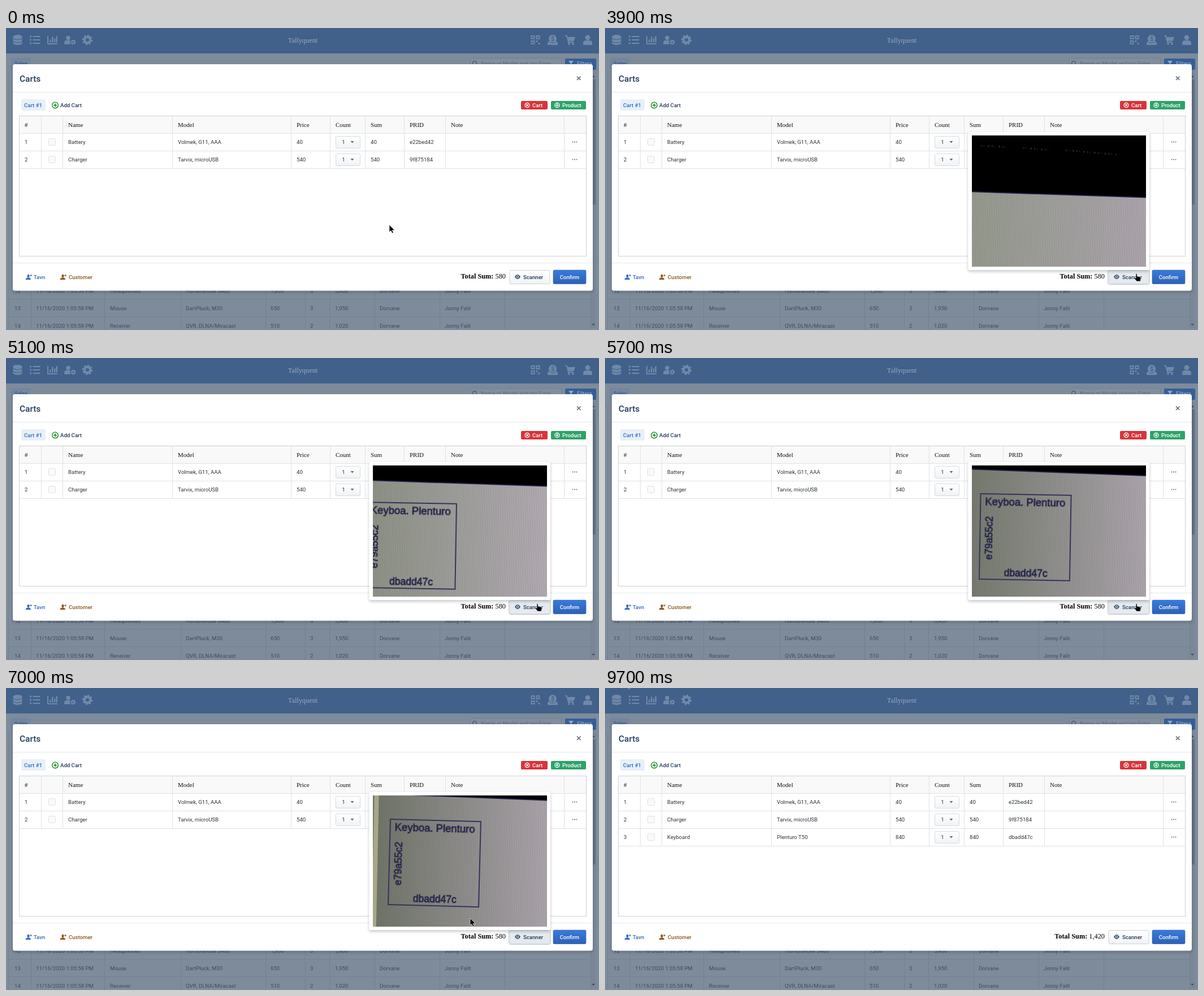
An HTML page that plays this animation: 1049x534 px, repeating every 9800 ms.

```html
<!DOCTYPE html>
<html lang="en">
<head>
<meta charset="utf-8">
<title>Carts</title>
<style>
  html, body { margin: 0; width: 100%; height: 100%; overflow: hidden; background: #7e8b9b; }
  svg { display: block; }
  text { font: 9.6px Roboto, sans-serif; fill: #2c343b; white-space: pre; }
  .serif { font: 11px "Liberation Serif", serif; fill: #111; }
  .total { font: 12.3px "Liberation Serif", serif; fill: #000; }
  .med { font-weight: 500; }
  .mid { text-anchor: middle; }
  .end { text-anchor: end; }
  .dim { fill: #3d4c60; }
  .label { filter: blur(.5px); }
  .label text { font: 18.5px "Liberation Sans", sans-serif; fill: #25234a; stroke: #25234a; stroke-width: .8px; }
  .label .code { font-size: 17.5px; }
</style>
</head>
<body>
<svg id="stage" width="1049" height="534" viewBox="0 0 1049 534"></svg>
<script>
const rect = (x, y, w, h, fill, extra = '') =>
  `<rect x="${x}" y="${y}" width="${w}" height="${h}" fill="${fill}" ${extra}/>`;
const text = (x, y, content, cls = '', extra = '') =>
  `<text x="${x}" y="${y}" class="${cls}" ${extra}>${content}</text>`;
const path = (d, fill, extra = '') => `<path d="${d}" fill="${fill}" ${extra}/>`;
const line = (d, color, width = 1, extra = '') =>
  path(d, 'none', `stroke="${color}" stroke-width="${width}" ${extra}`);
const circle = (x, y, r, fill, extra = '') =>
  `<circle cx="${x}" cy="${y}" r="${r}" fill="${fill}" ${extra}/>`;
const at = (x, y, body) => `<g transform="translate(${x} ${y})">${body}</g>`;
const fillColor = color => `style="fill:${color}"`;

// ---- Toolbar icons, each centred on 0,0 ----
const ink = '#7089a9', bar = '#41608a';
const gear = r => circle(0, 0, r * .58, 'none', `stroke="${ink}" stroke-width="${r * .48}"`) +
  circle(0, 0, r * .88, 'none',
    `stroke="${ink}" stroke-width="${r * .3}" stroke-dasharray="${r * .46}" pathLength="${r * .46 * 16}"`);
const person = circle(0, -4, 4.4, ink) + path('M-8 9v-3q0-5 5-5h6q5 0 5 5v3z', ink);
const icons = {
  database: path('M-8-6a8 3 0 0 1 16 0v12a8 3 0 0 1-16 0z', ink) +
    line('M-8-2.5q8 4 16 0M-8 3q8 4 16 0', bar, 1.2),
  list: [-6, 0, 6].map(y => circle(-7.5, y, 1.8, ink) + rect(-3.5, y - 1.1, 13, 2.2, ink)).join(''),
  chart: line('M-8-7V7H9', ink, 2) +
    [[-5, 5], [-1, 10], [3, 7], [6.6, 11]].map(([x, h]) => rect(x, 4.5 - h, 2.4, h, ink)).join(''),
  userGear: `<g transform="translate(-3 0) scale(.85)">${person}</g>` +
    at(6, 4, circle(0, 0, 6, bar) + gear(4.5)),
  gear: gear(9),
  tiles: [[-8, -8], [1, -8], [-8, 1]].map(([x, y]) =>
    rect(x + 1, y + 1, 5, 5, 'none', `stroke="${ink}" stroke-width="2"`)).join('') +
    rect(1, 1, 3, 3, ink) + rect(5, 5, 3, 3, ink),
  money: path('M-9 9v-4l3-3h12l3 3v4z', ink) + circle(0, -2, 7.5, ink, `stroke="${bar}"`) +
    text(0, 2, '$', 'mid med', `style="fill:${bar};font-size:11px"`),
  cart: line('M-9-7h3l3 11h9', ink, 2) + path('M-6-5H9L6.5 2h-10z', ink) +
    circle(-2, 7, 1.9, ink) + circle(5, 7, 1.9, ink),
  person
};

// ---- Dimmed page behind the dialog ----
function page() {
  const spots = { database: 20.5, list: 51, chart: 82, userGear: 113, gear: 144,
    tiles: 936.5, money: 967, cart: 998, person: 1029 };
  const columns = [15, 53, 184, 318, 468, 538, 582, 661, 776];
  const rows = [
    ['12', '11/16/2020 1:05:58 PM', 'Headphones', 'Humbravoxe S400', '1,800', '3', '5,400'],
    ['13', '11/16/2020 1:05:58 PM', 'Mouse', 'DartPluck, M30', '650', '3', '1,950'],
    ['14', '11/16/2020 1:05:58 PM', 'Receiver', 'QVR, DLNA/Miracast', '510', '2', '1,020']
  ];
  const edge = '#738092';
  return rect(0, 0, 1049, 534, '#7e8b9b') + rect(0, 0, 1049, 45, bar) +
    Object.entries(spots).map(([name, x]) => at(x, 21, icons[name])).join('') +
    text(525, 26, 'Tallyquent', 'mid', 'style="font:12.3px \'Liberation Serif\',serif;fill:#9aaabd"') +
    rect(8, 53, 36, 20, '#74869f', 'rx="2"') + text(15, 66, 'Sales', 'med', fillColor('#345a8e')) +
    rect(821.5, 53.5, 161, 20, '#818e9e', `rx="2" stroke="${edge}"`) +
    circle(829, 62, 3.4, 'none', 'stroke="#45566b" stroke-width="1.2"') +
    line('M831.5 64.5l3 3', '#45566b', 1.4) +
    text(840, 66, 'Name or Model and tag Enter', '', fillColor('#5a6a7d')) +
    rect(989, 54, 55, 20, '#355f99', 'rx="2"') +
    path('M995 58h9l-3.5 4.5v5l-2-1.5v-3.5z', '#97a7bc') +
    text(1010, 66, 'Filters', 'med', fillColor('#97a7bc')) +
    line('M4.5 80V534M1034.5 80V534M5 479.5H1034M5 510.5H1034', edge) +
    line([44, 174, 309, 459, 529, 572, 652, 767, 882].map(x => `M${x}.5 464V534`).join(''), edge) +
    rows.map((row, i) => [...row, 'Dorvane', 'Jonny Falit'].map((value, c) =>
      text(columns[c], 468 + i * 31, value, 'dim')).join('')).join('') +
    rect(1035, 80, 9, 450, '#7a8798') + rect(1036, 91, 7, 221, '#637083') +
    path('M1036 87l3-3 3 3zM1036 523l3 3 3-3z', '#3d4c60');
}

// ---- Dialog ----
const columnX = [33, 71, 110, 304, 514, 583, 645, 714, 787];
const button = (x, y, w, h, fill, extra = '') => rect(x, y, w, h, fill, `rx="2" ${extra}`);
const roundIcon = (x, y, r, color, turn = 0) =>
  `<g transform="translate(${x} ${y}) rotate(${turn})">` +
  circle(0, 0, r, 'none', `stroke="${color}" stroke-width="1.3"`) +
  line(`M${-r * .55} 0h${r * 1.1}M0 ${-r * .55}v${r * 1.1}`, color, 1.4) + '</g>';
const userIcon = (x, color) => at(x, 440,
  `<ellipse cx="-.5" cy="-1.5" rx="2" ry="2.8" fill="${color}"/>` +
  path('M-5.5 5q0-2.5 3.500-3.500h3q3 1 3 3.500z', color) +
  line('M2-2.500h3M3.500-4.500l2 2-2 2', color, 1));

function row(y, values) {
  const [number, name, model, price, id] = values;
  const cells = [number, null, name, model, price, null, price, id];
  return cells.map((value, i) => value ? text(columnX[i], y + 4, value) : '').join('') +
    button(75.5, y - 5.5, 12, 12, '#f9fafb', 'stroke="#dde1e4"') +
    button(583.5, y - 9.5, 43, 21, 'url(#soft)', 'stroke="#d6dadd"') +
    text(597, y + 4, '1', 'mid') + path(`M609.5 ${y - 1}h6l-3 3.500z`, '#5c6b78') +
    [1002.5, 1006, 1009.5].map(x => circle(x, y + .5, 1, '#5c7080')).join('') +
    line(`M24 ${y + 16.5}H1026`, '#dfe1e3') +
    line([62, 100, 294, 504, 573, 635, 704, 777, 987]
      .map(x => `M${x}.5 ${y - 14}v31`).join(''), '#dfe1e3');
}

function dialog() {
  const heads = ['#', '', 'Name', 'Model', 'Price', 'Count', 'Sum', 'PRID', 'Note'];
  const navy = '#22395a';
  return rect(12, 64, 1026, 400.5, '#fff', 'rx="4" filter="url(#shadow)"') +
    text(24, 95, 'Carts', 'med', `style="font-size:15.4px;fill:${navy}"`) +
    line('M1010 85.5l6.5 6.5M1016.5 85.5l-6.5 6.5', '#52667a', 1.5) +
    line('M12 113.5H1038M12 415.5H1038', '#e5e8eb') +
    button(27, 126, 43, 20, '#e8eff8') + text(48, 139.5, 'Cart #1', 'mid med', fillColor('#2f70cc')) +
    roundIcon(87, 136.5, 5.3, '#078410') + text(96, 140, 'Add Cart', 'med', fillColor(navy)) +
    button(911, 129, 47, 15, '#d7343a') + roundIcon(922, 136.5, 4, '#fff', 45) +
    text(931, 140, 'Cart', 'med', fillColor('#fff')) +
    button(964, 129, 62, 15, '#2da367') + roundIcon(975, 136.5, 4, '#fff') +
    text(984, 140, 'Product', 'med', fillColor('#fff')) +
    rect(23.5, 155.5, 1003, 248, '#fff', 'stroke="#cdd0d2"') +
    rect(24, 156, 1002, 30, '#f9f9f9') + line('M24 186.5H1026', '#dfe1e3') +
    line([62, 100, 294, 504, 573, 635, 704, 777, 987].map(x => `M${x}.5 156v31`).join(''), '#dfe1e3') +
    heads.map((head, i) => text(columnX[i], 175, head, 'serif')).join('') +
    row(201, ['1', 'Battery', 'Volmek, G11, AAA', '40', 'e22bed42']) +
    row(232, ['2', 'Charger', 'Tarvix, microUSB', '540', '9f875184']) +
    `<g id="added">${row(263, ['3', 'Keyboard', 'Plenturo T50', '840', 'dbadd47c'])}</g>` +
    userIcon(40, '#2f6ac8') + text(49, 444, 'Tavn', 'med', fillColor('#2f66bd')) +
    userIcon(101, '#8a5518') + text(111, 444, 'Customer', 'med', fillColor('#8a5518')) +
    text(884, 443, '<tspan font-weight="bold">Total Sum:</tspan> <tspan id="sum"></tspan>', 'total end') +
    rect(889.5, 426.5, 74, 27, 'none', 'id="ring" rx="3" stroke="#c3cedb"') +
    button(891, 428.5, 71, 24, 'url(#soft)', 'id="scanner" stroke="#cdd3d8"') +
    path('M900 440q5-8 10 0q-5 8-10 0z', '#3f566d') +
    circle(905, 440, 1.9, '#3f566d', 'stroke="#fff" stroke-width=".9"') +
    text(915, 444, 'Scanner', 'med', fillColor(navy)) +
    button(968, 428, 58, 24.5, 'url(#blue)', 'stroke="#2d60b0" stroke-width=".6"') +
    text(997, 444, 'Confirm', 'mid med', fillColor('#fff'));
}

// ---- Scanner popover with camera view ----
const labelArt = `<g class="label" id="label">
  ${rect(0, 0, 160, 151, 'none', 'stroke="#34335c" stroke-width="2"')}
  ${text(79, 20, 'Keyboa. Plenturo', 'mid')}
  ${text(82, 145, 'dbadd47c', 'mid code')}
  ${text(0, 0, 'e79a55c2', 'mid code', 'transform="translate(22 78) rotate(-90)"')}
</g>`;

const popover = `<g id="popover">
  ${rect(642.5, 184, 320.5, 244, '#fff', 'rx="3" filter="url(#shadow)"')}
  <g id="camera" clip-path="url(#lens)">
    ${rect(649, 190, 308, 232, '#000')}
    <g id="glints">${line('M665-81L715-78M740-77L790-73M815-73L905-65', '#777', 3,
      'stroke-dasharray="2 3 1 6 3 4" opacity=".3"')}</g>
    ${path('', 'url(#paper)', 'id="sheet" stroke="#1d1a42" stroke-width="2"')}
    ${path('', 'url(#stripes)', 'id="weave"')}
    ${line('M-24-60L-30 230', '#c6c39a', 8, 'id="strip" opacity=".65"')}
    ${labelArt}
  </g>
</g>`;

const gradient = (id, from, to, direction) =>
  `<linearGradient id="${id}" ${direction}><stop stop-color="${from}"/><stop offset="1" stop-color="${to}"/></linearGradient>`;
const down = 'x2="0" y2="1"';
const stage = document.getElementById('stage');
stage.innerHTML = `<defs>
  ${gradient('soft', '#fff', '#f0f3f6', down)}
  ${gradient('blue', '#397bdc', '#2c60b5', down)}
  ${gradient('paper', '#999', '#aaa', 'gradientUnits="userSpaceOnUse" x1="649" y1="0" x2="957" y2="0"')}
  <pattern id="stripes" width="4" height="4" patternUnits="userSpaceOnUse" patternTransform="rotate(-2)">
    ${rect(0, 0, 1.5, 4, '#36323c', 'opacity=".08"')}</pattern>
  <filter id="shadow" x="-10%" y="-10%" width="120%" height="125%">
    <feDropShadow dx="0" dy="2.5" stdDeviation="2.5" flood-color="#10161a" flood-opacity=".25"/></filter>
  <clipPath id="lens">${rect(649, 190, 308, 232, '#000')}</clipPath>
</defs>
${page()}${dialog()}${popover}
<g id="arrow">${path('M0 0V13L3 10.3L5 15L7.3 14L5.3 9.5H9.5Z', '#000', 'stroke="#fff" stroke-width=".7"')}</g>
<g id="hand">${path('M3 0q1.5-.5 2 1l.5 4 4.5 1q2 .5 2 2.5l-1 5.5H4.5L0 8.5q0-1.5 2-1l1 1z', '#000', 'stroke="#fff" stroke-width=".7"')}</g>`;

const el = id => document.getElementById(id);
const show = (id, visible) => el(id).setAttribute('visibility', visible ? 'visible' : 'hidden');
const move = (id, x, y, angle = 0) =>
  el(id).setAttribute('transform', `translate(${x} ${y}) rotate(${angle})`);
const lastBefore = (list, t, time = item => item) => list.filter(item => time(item) <= t).pop();

// ---- Motion ----
const LOOP = 9800;
const cameraTimes = [3900, 4400, 4600, 4800, 4900, 5100, 5200, 5300, 5700, 5900, 6100,
  6300, 6500, 6800, 7400, 7600, 7900, 8200];
// time, sheet edge left and right, label x, y and angle, brightness left and right
const cameraKeys = [
  [3900, 289, 300, 465, 325, 2, 150, 168],
  [4400, 286, 297, 480, 322, 2, 150, 168],
  [5100, 216, 227, 637, 255, 1, 142, 174],
  [6100, 183, 196, 683, 230, 1, 104, 164],
  [6800, 186, 199, 680, 232, 1.5, 112, 167],
  [8200, 289, 308, 630, 323, 4, 176, 194]
];
const cursorStops = [[1200, 936, 434], [7000, 821, 407], [7400, 457, 262],
  [8200, 347, 215], [8500, 136, 69], [8700, 43, 10], [9000, 0, -60], [9300, 36, -13], [9700, 37, -13]];

function cursorAt(t) {
  if (t >= 1200) return lastBefore(cursorStops, t, stop => stop[0]).slice(1);
  const p = Math.max(0, (Math.floor(t / 100) * 100 - 200) / 1000);
  const eased = p * p * (3 - 2 * p);
  return [678 + 258 * eased, 348 + 86 * eased];
}

function cameraAt(t) {
  const i = Math.max(1, cameraKeys.findIndex(key => key[0] >= t));
  const [a, b] = [cameraKeys[i - 1], cameraKeys[i]];
  const p = (t - a[0]) / (b[0] - a[0]);
  return a.map((value, k) => value + (b[k] - value) * p).slice(1);
}

function drawCamera(t) {
  show('camera', t >= 3900 && t < 8700);
  if (t < 3900) return;
  const [left, right, x, y, angle, dark, light] = cameraAt(lastBefore(cameraTimes, t));
  const sheet = `M640 ${left}L970 ${right}V440H640Z`;
  el('sheet').setAttribute('d', sheet);
  el('weave').setAttribute('d', sheet);
  const [from, to] = el('paper').children;
  from.setAttribute('stop-color', `rgb(${dark - 2},${dark + 3},${dark - 10})`);
  to.setAttribute('stop-color', `rgb(${light + 3},${light - 4},${light + 3})`);
  move('label', x, y, angle);
  move('strip', x, y);
  move('glints', 0, left);
}

function drawPopover(t) {
  show('popover', t >= 1800 && t < 8700);
  const p = Math.min(1, Math.max(0, (Math.floor(t / 100) * 100 - 1700) / 500));
  const scale = 1 - .7 * (1 - p) ** 3;
  el('popover').setAttribute('transform', `translate(926 428) scale(${scale}) translate(-926 -428)`);
  el('popover').setAttribute('opacity', t >= 8500 ? .3 : 1 - (1 - p) ** 3);
}

function draw() {
  const t = performance.now() % LOOP;
  const [x, y] = cursorAt(t);
  const overButton = t < 7000 && x >= 891 && y >= 424;
  move('arrow', x, y);
  move('hand', x, y);
  show('arrow', !overButton);
  show('hand', overButton);

  const active = t >= 1600 && t < 8200;
  show('ring', active);
  el('scanner').setAttribute('fill', active && t < 7400 ? '#e5eaef' : 'url(#soft)');
  show('added', t >= 7600);
  el('sum').textContent = t >= 7600 ? '1,420' : '580';
  drawPopover(t);
  drawCamera(t);
  requestAnimationFrame(draw);
}
draw();
</script>
</body>
</html>
```
